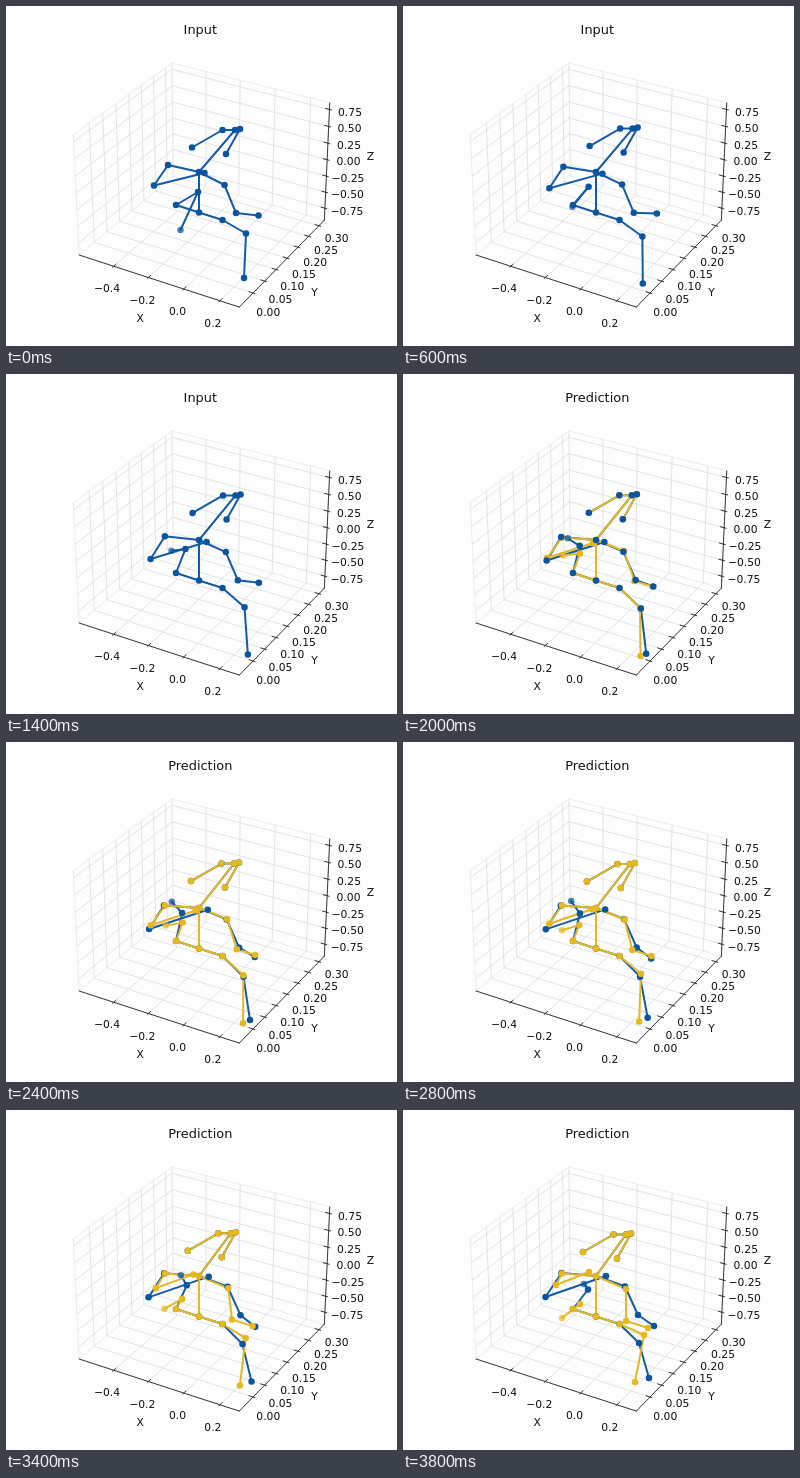
Animation of 391 by 340 pixels, one loop 4 s. Source, as an HTML page:

```html
<!DOCTYPE html>
<html lang="en">
<head>
<meta charset="utf-8">
<title>Skeleton plot</title>
<style>
html, body { margin: 0; width: 100%; height: 100%; overflow: hidden; background: #fdfdfd; }
svg { display: block; }
text { font: 10.75px "DejaVu Sans", sans-serif; text-anchor: middle; fill: #111; }
#title { font-size: 12.9px; }
.grid { stroke: #e0e0e0; stroke-width: .9; }
.edge { stroke: #e9e9e9; stroke-width: .8; }
.axis { stroke: #222; stroke-width: .9; }
.input { stroke: #145aa5; fill: #0b549f; }
.guess { stroke: #e3b827; fill: #e6b81c; }
line { stroke-linecap: round; }
.bones line { stroke-width: 2; }
.joints circle { stroke: none; }
</style>
</head>
<body>
<svg id="stage" width="391" height="340" viewBox="0 0 391 340">
  <g id="plot"></g>
  <text id="title" x="194.3" y="27.7"></text>
</svg>
<script>
const LOOP = 4000, STEP = 200, SWITCH = 2000, END = LOOP - STEP;
const stage = document.getElementById('stage');
const plot = document.getElementById('plot');
const title = document.getElementById('title');

function add(parent, tag, attrs) {
  const el = document.createElementNS('http://www.w3.org/2000/svg', tag);
  set(el, attrs);
  parent.appendChild(el);
  return el;
}
function set(el, attrs) {
  for (const key in attrs) el.setAttribute(key, attrs[key]);
}
function ends([x1, y1], [x2, y2]) {
  return { x1, y1, x2, y2 };
}

// Perspective view of the unit cube: elevation 30, azimuth -60
function project(x, y, z) {
  const a = (x - .5) * 1.19, b = (y - .5) * 1.19, c = (z - .5) * .893;
  const depth = 10 - (.433 * a - .75 * b + .5 * c);
  return [
    198 + 1542 * (.866 * a + .5 * b) / depth,
    173.2 - 1535 * (-.25 * a + .433 * b + .866 * c) / depth
  ];
}
function segment(cls, from, to) {
  add(plot, 'line', { class: cls, ...ends(project(...from), project(...to)) });
}
function label(text, x, y) {
  add(plot, 'text', { x, y: y + 3.9 }).textContent = text;
}
const ticks = (n, first, step) => Array.from({ length: n }, (_, i) => first + i * step);
const number = (v, digits) => v.toFixed(digits).replace('-', '\u2212');

function drawAxes() {
  const xs = ticks(4, .225, .22), ys = ticks(7, .15, .13), zs = ticks(7, .106, .14);
  const kind = v => v % 1 ? 'grid' : 'edge';
  for (const x of [0, 1, ...xs]) {
    segment(kind(x), [x, 0, 0], [x, 1, 0]);
    segment(kind(x), [x, 1, 0], [x, 1, 1]);
  }
  for (const y of [0, 1, ...ys]) {
    segment(kind(y), [0, y, 0], [1, y, 0]);
    segment(kind(y), [0, y, 0], [0, y, 1]);
  }
  for (const z of [1, ...zs]) {
    segment(kind(z), [0, 0, z], [0, 1, z]);
    segment(kind(z), [0, 1, z], [1, 1, z]);
  }
  segment('axis', [0, 0, 0], [1, 0, 0]);
  segment('axis', [1, 0, 0], [1, 1, 0]);
  segment('axis', [1, 1, 0], [1, 1, 1]);

  const out = .012, inner = .024;
  xs.forEach((x, i) => {
    segment('axis', [x, -out, 0], [x, inner, 0]);
    label(number(-.4 + i * .2 + 1e-9, 1), 101 + i * 35.3, 282.3 + i * 11.5);
  });
  ys.forEach((y, i) => {
    segment('axis', [1 + out, y, 0], [1 - inner, y, 0]);
    label(number(i * .05, 2), 262.3 + i * 12.3 - i * i * .15, 305.8 - i * 13.1 + i * i * .14);
  });
  zs.forEach((z, i) => {
    segment('axis', [1 + out, 1, z], [1 - inner, 1, z]);
    label(number(-.75 + i * .25, 2), 341 + i * .5, 204.8 - i * 16.5);
  });
  label('X', 134.3, 312);
  label('Y', 308.6, 286);
  label('Z', 364.5, 150.4);
}

// Joint path: straight drift, plus an arc and a full swing along the way
function path(start, drift = [0, 0], arc = [0, 0], swing = [0, 0]) {
  return u => start.map((s, k) =>
    s + drift[k] * u + arc[k] * 4 * u * (1 - u) + swing[k] * Math.sin(2 * Math.PI * u));
}

const BONES = [
  'root hipR', 'hipR kneeR', 'kneeR footR', 'root hipL', 'hipL kneeL', 'kneeL footL',
  'root neck', 'neck armR', 'armR elbowR', 'elbowR handR',
  'neck armL', 'armL elbowL', 'elbowL handL',
  'neck nose', 'nose eyeR', 'eyeR earR', 'nose eyeL', 'eyeL earL'
].map(pair => pair.split(' '));

const TRUNK = {
  root: path([193, 206.5]),
  hipR: path([170, 199]),
  hipL: path([216.5, 214]),
  neck: path([193, 166])
};

// The head sways as one piece
const sway = (x, y) => path([x, y], [-6, .5], [3, -2.9]);
const HEAD = {
  nose: sway(229, 124),
  eyeR: sway(216.5, 124),
  eyeL: sway(234, 123),
  earR: sway(186, 141.5),
  earL: sway(220, 148)
};

const INPUT = {
  ...TRUNK, ...HEAD,
  armR: path([162, 159], [-3.5, 4], [-2, 2]),
  elbowR: path([148, 179.5], [-5.5, 7.5], [-1.5, 3]),
  handR: path([198.5, 167], [4.5, -1], [.5, 1.5]),
  armL: path([218.5, 179], [3.5, -2.5]),
  elbowL: path([230, 207], [5, -2]),
  handL: path([252.5, 209.5], [-1.5, 6.5], [-1, -1], [2.5, -3]),
  kneeR: path([192, 186], [-7, -6.5], [-11.5, -10.5], [1, 1.5]),
  footR: path([174.5, 224], [6.5, -50], [-13, -33], [1, 2.5]),
  kneeL: path([240, 227.5], [-4, 5.5], [0, 4]),
  footL: path([238, 272], [8, -4], [1, 10], [0, 1])
};
const GUESS = {
  ...TRUNK,
  armR: path([159, 163.5]),
  elbowR: path([144, 184], [9, -9]),
  handR: path([190, 169], [-4, -7]),
  armL: path([221, 177], [2, 2]),
  elbowL: path([231.5, 207], [-8.5, 4]),
  handL: path([249.5, 212.5], [-4.5, 5.5]),
  kneeR: path([177, 179.5], [0, 14.5], [-1, 0]),
  footR: path([160, 181.5], [-1, 26.5], [-1, 0]),
  kneeL: path([237, 234], [4, -9]),
  footL: path([237.5, 282], [-5.5, -10])
};

const inputPhase = time => time / END;
const guessPhase = time => Math.max(0, (time - SWITCH) / (END - SWITCH)) ** 1.7;

function makeFigure(cls) {
  const bones = add(stage, 'g', { class: 'bones ' + cls });
  const joints = add(stage, 'g', { class: 'joints ' + cls });
  const lines = BONES.map(() => add(bones, 'line', {}));
  const dots = {};
  for (const name in INPUT) {
    dots[name] = add(joints, 'circle', { r: 3.25, opacity: name === 'footR' ? .72 : 1 });
  }
  function pose(spots) {
    for (const name in dots) {
      const [cx, cy] = spots[name];
      set(dots[name], { cx, cy });
    }
    BONES.forEach(([a, b], i) => set(lines[i], ends(spots[a], spots[b])));
  }
  return { bones, joints, pose };
}

function evaluate(paths, phase) {
  const spots = {};
  for (const name in paths) spots[name] = paths[name](phase);
  return spots;
}

drawAxes();
const input = makeFigure('input');
const guess = makeFigure('guess');
let shown = -1;

function draw() {
  const time = Math.floor(performance.now() % LOOP / STEP) * STEP;
  if (time !== shown) {
    shown = time;
    const predicting = time >= SWITCH;
    title.textContent = predicting ? 'Prediction' : 'Input';
    input.pose(evaluate(INPUT, inputPhase(time)));
    guess.pose({
      ...evaluate(HEAD, inputPhase(time)),
      ...evaluate(GUESS, guessPhase(time))
    });
    for (const part of [guess.bones, guess.joints]) {
      part.style.display = predicting ? '' : 'none';
    }
    // Input joints lie on top only when the prediction begins
    const order = time === SWITCH ? [guess, input] : [input, guess];
    stage.append(input.bones, guess.bones, ...order.map(f => f.joints));
  }
  requestAnimationFrame(draw);
}
draw();
</script>
</body>
</html>
```
